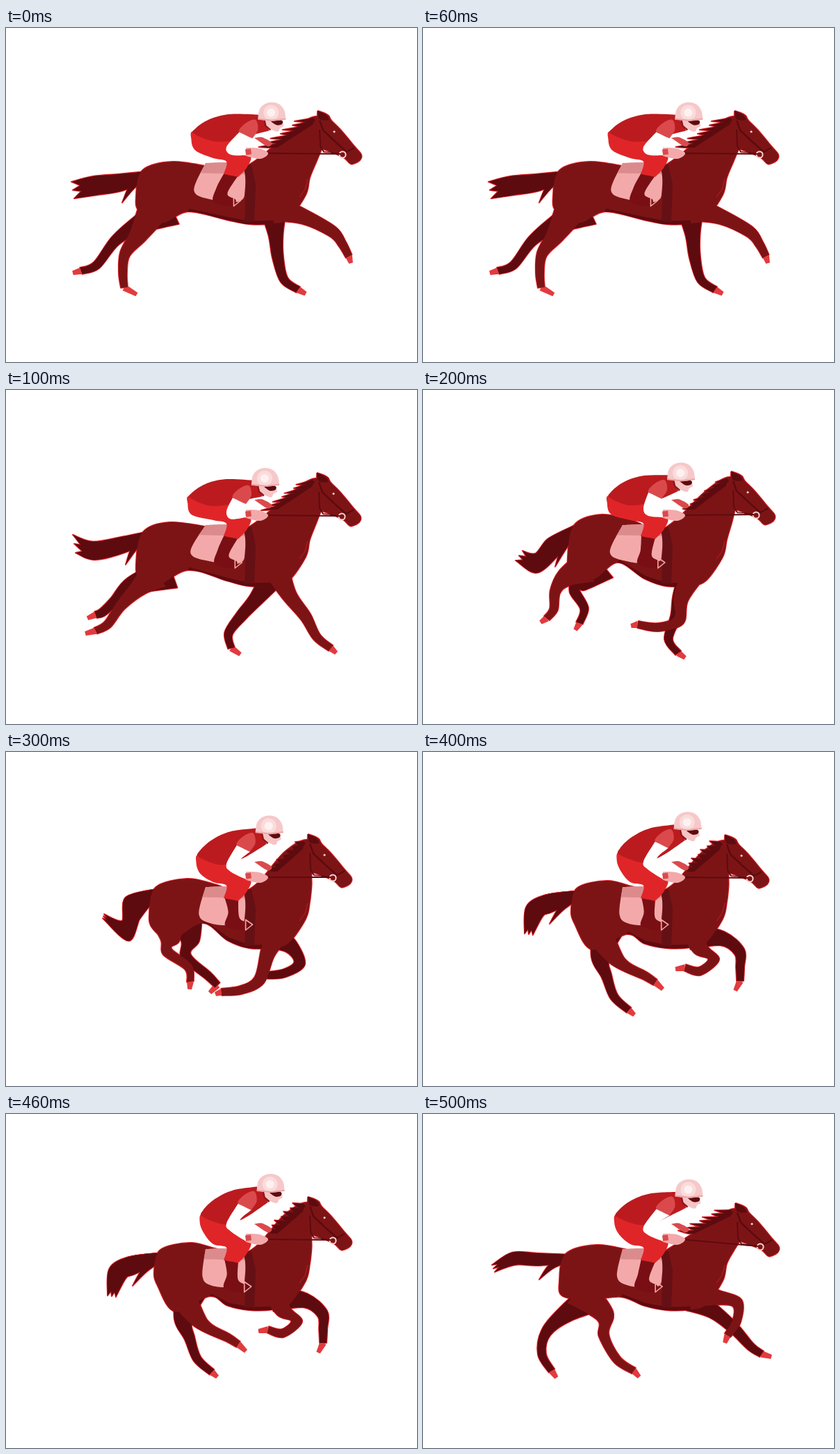
These frames come from a looping animation (591 px wide and 480 px high, 600 ms). An HTML page with a canvas:

```html
<!DOCTYPE html>
<html lang="en">
<head>
<meta charset="utf-8">
<title>Gallop</title>
<style>
html, body { margin: 0; width: 100%; height: 100%; overflow: hidden; background: #fff; }
canvas { display: block; }
</style>
</head>
<body>
<canvas id="stage" width="591" height="480"></canvas>
<script>
const ctx = document.getElementById('stage').getContext('2d');
const STEP = 100;
const COAT = '#7c1416', DARK = '#5d0b0f', EDGE = '#e3262d', HOOF = '#e23b3f';
const RED = '#e02528', SHIRT = '#bb1b1f', CUFF = '#da4a4c', SKIN = '#f3a9aa', PALE = '#f8d2d2';
const HIND = [24, 13, 7.5, 6, 5], FORE = [18, 10.5, 8, 6, 5];

// Trunk: rump, croup, flank, haunch. Legs: upper joint, middle joint, fetlock, coronet, toe.
const poses = [
  {
    trunk: '187,242 240,192 262,264 225,280', head: [1, 0],
    tail: '165,222 125,227 96,233', fan: [2, 12], bulk: 10,
    farHind: '190,283 157,306 130,341 108,349 96,352', nearHind: '190,298 171,325 168,352 170,373 188,383',
    farFore: '388,298 391,330 400,362 420,376 431,382', nearFore: '430,272 470,293 484,311 493,328 496,338'
  },
  {
    trunk: '187,250 235,190 262,259 215,283', head: [0, 0],
    tail: '170,222 125,231 98,221', fan: [2, 13], bulk: 9,
    farHind: '180,282 156,304 138,320 129,323 117,328', nearHind: '192,283 165,310 146,337 129,346 114,350',
    farFore: '360,300 338,325 320,350 324,371 337,380', nearFore: '408,296 431,326 447,355 467,371 475,378'
  },
  {
    trunk: '208,240 255,179 280,248 245,272', head: [-4, -2],
    tail: '188,225 162,249 138,238', fan: [-5, 7], bulk: 13,
    farHind: '225,278 218,289 232,314 225,335 219,345', nearHind: '203,271 190,290 188,315 178,328 169,334',
    farFore: '369,300 364,325 353,358 367,378 377,385', nearFore: '371,300 368,331 338,341 309,337 299,339'
  },
  {
    trunk: '206,232 260,182 283,246 238,270', head: [-13, -1],
    tail: '184,220 172,257 140,236', fan: [-1, 3], bulk: 16,
    farHind: '265,272 259,294 290,321 304,335 293,346', nearHind: '236,272 232,287 262,309 265,330 264,341',
    farFore: '410,280 422,304 400,318 375,321 368,322', nearFore: '376,290 364,328 338,342 310,345 301,348'
  },
  {
    trunk: '213,225 265,185 293,262 243,284', head: [-13, 0],
    tail: '180,218 160,230 152,262', fan: [6, 1], bulk: 13,
    farHind: '255,296 264,322 275,352 296,371 304,378', nearHind: '272,290 291,308 318,321 334,331 345,341',
    farFore: '430,268 455,287 456,310 456,329 449,343', nearFore: '400,284 418,298 398,315 377,310 363,312'
  },
  {
    trunk: '196,240 250,188 285,263 240,267', head: [2, 9],
    tail: '165,209 130,208 101,222', fan: [2, 5], bulk: 8,
    farHind: '207,286 177,314 171,345 185,369 192,379', nearHind: '262,290 260,318 279,353 303,369 311,378',
    farFore: '418,284 447,308 471,334 487,345 501,349', nearFore: '425,264 452,272 451,298 438,318 434,329'
  }
];

const HEAD = '447,119! 456,122 463,126 467,133 480,146 501,171 510,182 508,190 499,195 494,195 484,186 463,177 452,172 444,158 440,140 446,129';

// Parses "x,y" lists; a trailing "!" doubles the point into a sharp corner.
const points = s => s.split(' ').flatMap(p => {
  const xy = p.split(',').map(parseFloat);
  return p.endsWith('!') ? [xy, xy] : [xy];
});
const add = ([x, y], dx, dy) => [x + dx, y + dy];
const mix = (a, b, t) => [a[0] + (b[0] - a[0]) * t, a[1] + (b[1] - a[1]) * t];
const wave = (i, mean, amp, peak, k = 1) => mean + amp * Math.cos((i - peak) * k * Math.PI / 3);

function curve(shape) {
  const p = typeof shape === 'string' ? points(shape) : shape;
  const n = p.length, path = new Path2D();
  path.moveTo(...p[0]);
  for (let i = 0; i < n; i++) {
    const [a, b, c, d] = [n - 1, 0, 1, 2].map(k => p[(i + k) % n]);
    if (b === c) continue;
    path.bezierCurveTo(b[0] + (c[0] - a[0]) / 6, b[1] + (c[1] - a[1]) / 6,
      c[0] - (d[0] - b[0]) / 6, c[1] - (d[1] - b[1]) / 6, c[0], c[1]);
  }
  return path;
}

function poly(s, closed) {
  const path = new Path2D();
  points(s).forEach(p => path.lineTo(...p));
  if (closed) path.closePath();
  return path;
}

function normal(a, b) {
  const dx = b[0] - a[0], dy = b[1] - a[1], len = Math.hypot(dx, dy) || 1;
  return [-dy / len, dx / len];
}

// Smooth outline around a chain of joints with a radius at each joint.
function limb(joints, radii) {
  const side = sign => joints.map((p, i) => {
    const [nx, ny] = normal(joints[Math.max(i - 1, 0)], joints[Math.min(i + 1, joints.length - 1)]);
    return add(p, nx * radii[i] * sign, ny * radii[i] * sign);
  });
  const left = side(1), right = side(-1).reverse();
  return curve([left[0], ...left, left.at(-1), right[0], ...right, right.at(-1)]);
}

function leg(root, joints, radii) {
  const p = points(joints), toe = p.pop(), ankle = p.at(-1);
  const [nx, ny] = normal(ankle, toe);
  const hoof = [[ankle, 5], [toe, 3], [toe, -3], [ankle, -5]].map(([q, r]) => add(q, nx * r, ny * r));
  return { path: limb([root, ...p], radii), hoof: poly(hoof.join(' '), true) };
}

function fill(path, color) {
  ctx.fillStyle = color;
  ctx.fill(path);
}

function stroke(path, color, width) {
  ctx.strokeStyle = color;
  ctx.lineWidth = width;
  ctx.stroke(path);
}

function dot(x, y, r) {
  const path = new Path2D();
  path.arc(x, y, r, 0, Math.PI * 2);
  return path;
}

function at([x, y], draw) {
  ctx.save();
  ctx.translate(x, y);
  draw();
  ctx.restore();
}

function clipTo(path, draw) {
  ctx.save();
  ctx.clip(path);
  draw();
  ctx.restore();
}

function tailStrands(root, { tail, fan, bulk }) {
  const [a, b, tip] = points(tail);
  const strands = [-1, 0, 1].map(k => limb(
    [root, add(a, 0, fan[1] * k * 0.2), add(b, fan[0] * k * 0.4, fan[1] * k * 0.4), add(tip, fan[0] * k, fan[1] * k)],
    [6, bulk, bulk * 0.9, 0]));
  const wisp = limb([root, add(mix(root, a, 0.6), 2, 10), add(a, 2, 29)], [4, 4, 0]);
  return [...strands, wisp];
}

function mane(from, to, dx, dy) {
  const n = 7, path = new Path2D();
  path.moveTo(from[0] + 5, from[1] + 6);
  for (let i = 0; i < n; i++) {
    const p = mix(from, to, i / n), q = mix(from, to, (i + 1) / n), k = i % 2 ? 0.75 : 1;
    const tip = add(mix(p, q, 0.5), dx * k, dy * k);
    path.lineTo(...p);
    path.quadraticCurveTo(p[0] + dx * 0.4, p[1] + dy * 0.4 + 1, ...tip);
    path.quadraticCurveTo(q[0] + dx * 0.2, q[1] + dy * 0.2, ...q);
  }
  path.lineTo(to[0] + 8, to[1]);
  path.closePath();
  return path;
}

function drawHead() {
  fill(curve(HEAD), COAT);
  fill(curve('447,119! 458,124 463,132 450,131'), DARK);
  stroke(poly('450,133 455,147 472,163 489,178 500,172'), DARK, 2.5);
  stroke(poly('450,146 451,170 456,178 480,181'), DARK, 2);
  fill(dot(471, 149, 1.6), PALE);
  stroke(poly('456,179 466,180'), '#ee8488', 1.5);
  stroke(dot(483, 182, 4.5), PALE, 2);
}

function drawHorse(p, i) {
  const [rump, croup, flank, haunch] = points(p.trunk);
  const poll = add(p.head, 446, 127), belly = [318, flank[1] + 0.7 * (281 - flank[1])];
  const body = curve([
    rump, [rump[0] + 9, mix(croup, rump, 0.25)[1]], croup, [300, croup[1] + 8], [335, 201], [362, 188],
    add(poll, -33, 18), poll, add(poll, 16, 24), add(poll, 7, 47), mix([446, 192], add(p.head, 446, 192), 0.5),
    [437, 215], [431, 240], [407, 274], [385, 281], [350, 282], belly, flank, haunch, add(rump, 5, 22)
  ]);
  const thigh = add(rump, 28, 14);
  const farHind = leg(mix(thigh, flank, 0.5), p.farHind, HIND), nearHind = leg(thigh, p.nearHind, HIND);
  const farFore = leg([385, 266], p.farFore, FORE), nearFore = leg([390, 260], p.nearFore, FORE);
  const locks = mane(add(poll, -5, 2), [382, 172], wave(i, -16, -7, 0), wave(i, 0, 4, 1));
  const layers = [
    [farHind.path, DARK], [farFore.path, DARK],
    ...tailStrands([rump[0] + 14, croup[1] + 20], p).map(s => [s, DARK]),
    [body, COAT], [nearHind.path, COAT], [nearFore.path, COAT]
  ];

  [...layers.map(l => l[0]), locks].forEach(path => stroke(path, EDGE, 2));
  at(p.head, () => stroke(curve(HEAD), EDGE, 2));
  [farHind, nearHind, farFore, nearFore].forEach(l => fill(l.hoof, HOOF));
  layers.forEach(([path, color]) => fill(path, color));

  clipTo(body, () => stroke(poly(`${flank} ${belly} 350,282 385,281`), DARK, 9));
  stroke(poly('434,217 430,232 422,243'), '#b51b20', 1.2);
  stroke(poly('346,198 352,225 350,278'), '#651014', 14);
  fill(nearFore.path, COAT);
  fill(locks, DARK);
  at(p.head, drawHead);
}

function drawCap() {
  fill(curve('-13,8! 13,8! 15,14 17,19 12,22 9,27 1,25 -8,18'), '#f6c4c5');
  stroke(poly('-11,10 -9,19 -2,25'), '#8f171b', 2.5);
  fill(curve('-1,11 14,11 15,16 8,18 2,15'), DARK);
  fill(curve('-20,9! -18,-4 -11,-12 0,-15 11,-12 18,-3 20,9! 0,12'), '#f6c8c9');
  fill(dot(-1, 0, 11), '#fadcdc');
  fill(dot(-1, 0, 6), '#fff1f0');
  stroke(poly('-20,9 0,11 20,9'), '#efa3a5', 2);
}

function drawRider(p, i) {
  const cap = [wave(i, 378, 5.8, 4.8) + wave(i, 0, 2.5, 0, 2), wave(i, 114, 13, 0.9)];
  const hip = [wave(i, 270, 8.7, 4.1), wave(i, 159.5, 4.3, 1.4)];
  const heel = wave(i, 307, 9, 3.3), lift = cap[1] - 114;
  const elbow = [317, 166 + 0.65 * lift], shoulder = add(cap, -16, 3);
  const back = (t, dy) => add(mix(hip, shoulder, t), -4, dy);

  const cloth = curve(`287,194! 338,198 343,240 333,250! 297,247 ${hip[0] + 4},234`);
  fill(cloth, SKIN);
  clipTo(cloth, () => fill(poly('260,185 345,185 345,210 260,208', true), '#dc8b8d'));

  fill(curve('357,158! 368,157 382,165 376,170'), CUFF);
  stroke(poly(`370,180 ${add(p.head, 480, 181)}`), DARK, 2);
  fill(curve(`314,208! 334,212! ${heel + 20},238 ${heel + 32},247 ${heel + 26},256 ${heel},250 ${heel + 4},230`), '#790f14');
  fill(curve(`${add(hip, 5, -12)} ${hip} ${add(hip, 6, 16)} 298,187 317,192 313,210! 334,214! 346,201 352,184 332,174 319,160`), RED);
  fill(curve(`${shoulder}! ${back(0.6, -15)} ${back(0.3, -18)} ${back(0.1, -12)} ${add(hip, 4, -8)} ${add(hip, 33, 3)} 330,${159 + lift * 0.3} 348,${152 + lift * 0.4} ${add(cap, -4, 26)}!`), SHIRT);
  at(cap, () => fill(curve('-24,10 -39,16 -47,28 -28,37! -20,24'), CUFF));
  fill(curve(`${add(cap, -47, 28)}! ${elbow} ${add(elbow, 6, 11)} 345,183! 352,173! ${add(elbow, 19, -3)} ${add(cap, -28, 37)}!`), '#fff');
  fill(curve('345,172! 364,173 377,180 366,188 345,184!'), SKIN);
  stroke(poly('348,174 349,182'), CUFF, 8);
  at([heel + 33, 248], () => stroke(poly('-4,-7 6,0 -4,8', true), SKIN, 1.6));
  at(cap, drawCap);
}

let shown = -1;
function tick() {
  const i = Math.floor((performance.now() - start) / STEP) % poses.length;
  if (i !== shown) {
    shown = i;
    ctx.fillStyle = '#fff';
    ctx.fillRect(0, 0, 591, 480);
    drawHorse(poses[i], i);
    drawRider(poses[i], i);
  }
  requestAnimationFrame(tick);
}
ctx.lineJoin = 'round';
const start = performance.now();
tick();
</script>
</body>
</html>
```
